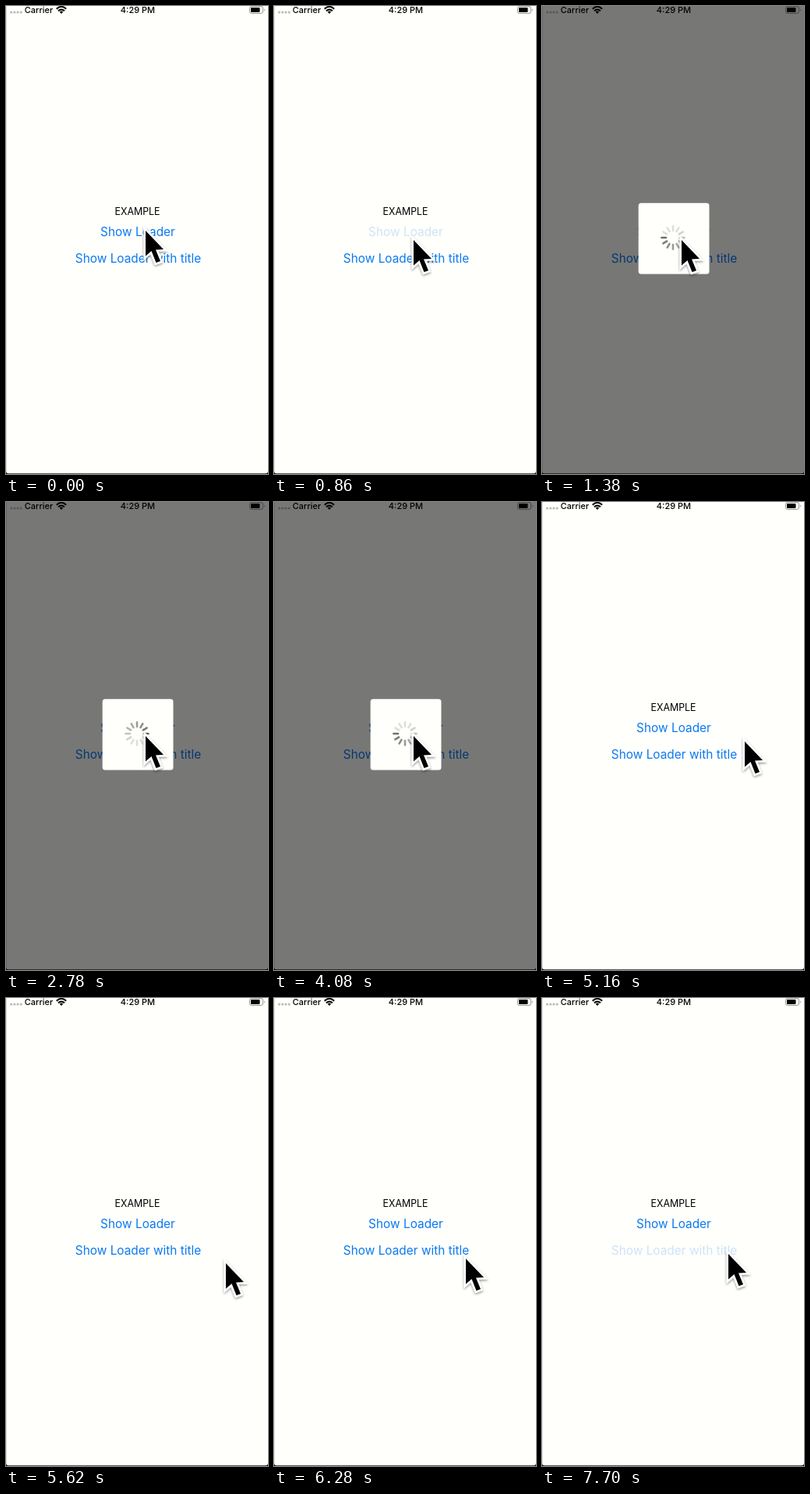
These frames come from a looping animation (336 by 598 pixels, 8 s). An HTML page:

```html
<!DOCTYPE html>
<html lang="en">
<head>
<meta charset="utf-8">
<title>Loader demo</title>
<style>
  html, body { margin: 0; width: 100%; height: 100%; overflow: hidden; background: #fffffb; }
  svg { display: block; width: 100vw; height: 100vh; }
  text { font-family: Inter, "Liberation Sans", sans-serif; text-anchor: middle; }
  .status { font-size: 11px; font-weight: 500; }
  .caption { font-size: 12.4px; }
  .link { font-size: 15.4px; fill: #0a78f5; }

  .loader, .pointer, .spinner, .link { animation: 8s linear infinite; }
  .loader { animation-name: show; }
  .pointer { animation-name: travel; }
  .spinner { animation-name: spin; }
  .plain { animation-name: press-plain; }
  .titled { animation-name: press-titled; }

  /* 1380–4180 ms */
  @keyframes show {
    0%, 17.249% { visibility: hidden; }
    17.25%, 52.249% { visibility: visible; }
    52.25%, 100% { visibility: hidden; }
  }
  /* one spoke every 75 ms */
  @keyframes spin {
    0%, 17.25% { transform: rotate(0deg); animation-timing-function: steps(38); }
    52.875%, 100% { transform: rotate(1140deg); }
  }
  @keyframes press-plain {
    0%, 10.749% { opacity: 1; }
    10.75%, 17.3% { opacity: .2; }
    23%, 100% { opacity: 1; }
  }
  @keyframes press-titled {
    0%, 94.499% { opacity: 1; }
    94.5%, 100% { opacity: .2; }
  }
  @keyframes travel {
    0% { transform: translate(179px, 287px); animation-timing-function: ease-in-out; }
    5.5%, 56% { transform: translate(179px, 299px); animation-timing-function: ease-in-out; }
    64.5% { transform: translate(260px, 306px); animation-timing-function: ease-in-out; }
    71.75%, 73.5% { transform: translate(284px, 342px); animation-timing-function: ease-in-out; }
    78.5% { transform: translate(246px, 333px); animation-timing-function: ease-out; }
    82%, 100% { transform: translate(239px, 327px); }
  }
</style>
</head>
<body>
<svg viewBox="0 0 336 598" preserveAspectRatio="none">
  <defs>
    <filter id="shadow" x="-50%" y="-30%" width="200%" height="170%">
      <feDropShadow dx="0" dy="1.5" stdDeviation="1.5" flood-color="#000" flood-opacity=".45"/>
    </filter>
  </defs>
  <rect width="336" height="598" fill="#fffffb"/>

  <g fill="#b9b9b9">
    <circle cx="6.7" cy="8" r="1.6"/>
    <circle cx="10.9" cy="8" r="1.6"/>
    <circle cx="15.1" cy="8" r="1.6"/>
    <circle cx="19.3" cy="8" r="1.6"/>
  </g>

  <text class="caption" x="168.5" y="267.3">EXAMPLE</text>
  <text class="link plain" x="169" y="293.8">Show Loader</text>
  <text class="link titled" x="169.5" y="327.8">Show Loader with title</text>

  <rect class="loader" width="336" height="598" fill="#000" opacity=".535"/>

  <g class="status">
    <text x="42" y="9">Carrier</text>
    <text x="169" y="9">4:29 PM</text>
  </g>
  <g fill="none" stroke="#000" stroke-width="1.9">
    <path d="M64.8 3.8Q71-2.2 77.2 3.8M67 6.3Q71 2.5 75 6.3"/>
    <path d="M68.7 7.6Q71 5.6 73.3 7.6L71 10Z" fill="#000" stroke="none"/>
  </g>
  <rect x="312.5" y=".5" width="17" height="9" rx="2.5" fill="none" stroke="#000" stroke-opacity=".4"/>
  <rect x="314" y="2" width="11.5" height="6" rx="1"/>
  <path d="M331 3.4Q333 5 331 6.6Z" fill-opacity=".4"/>

  <path d="M.5 0V598" stroke="#000" stroke-opacity=".14"/>
  <path d="M0 597.5H336" stroke="#000" stroke-opacity=".65"/>
  <path d="M0 594Q0 598 4 598H0ZM336 594Q336 598 332 598H336Z"/>

  <g class="loader">
    <rect x="123.7" y="251.7" width="90.8" height="90.8" rx="3.5" fill="#fffffb"/>
    <g transform="translate(168 296)">
      <g class="spinner" id="spokes" stroke-width="2.6" stroke-linecap="round"></g>
    </g>
  </g>

  <g class="pointer">
    <path d="M0 0V32.5L7.5 26L13.5 41L19 39L13 24.5L23 24Z" fill="#000" stroke="#fff"
      stroke-width="5" paint-order="stroke" filter="url(#shadow)"/>
  </g>
</svg>
<script>
  const spokes = document.getElementById("spokes");
  const COUNT = 12;
  // The darkest spoke points left; the tail fades counterclockwise.
  for (let i = 0; i < COUNT; i++) {
    const spoke = document.createElementNS(spokes.namespaceURI, "path");
    const grey = Math.min(222, 112 + i * 14);
    spoke.setAttribute("d", "M-9 0H-14.6");
    spoke.setAttribute("stroke", `rgb(${grey},${grey},${grey})`);
    spoke.setAttribute("transform", `rotate(${-i * 360 / COUNT})`);
    spokes.append(spoke);
  }
</script>
</body>
</html>
```
